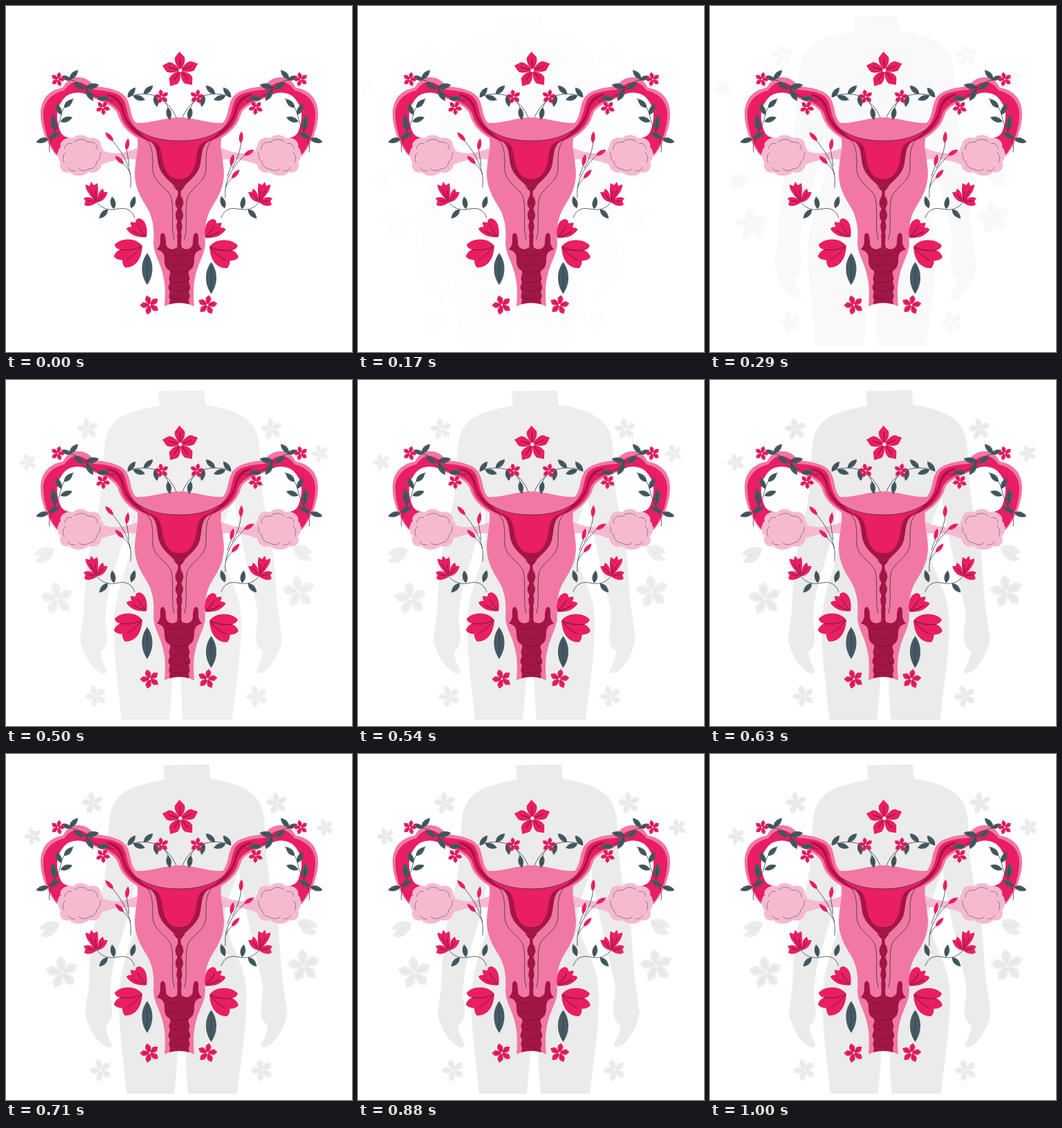
Write an HTML page that moves like this. It is 500 px wide and 500 px high and loops after 1.04 s.

```html
<!DOCTYPE html>
<html lang="en">
<head>
<meta charset="utf-8">
<title>Floral uterus</title>
<style>
  html, body { margin: 0; width: 100%; height: 100%; overflow: hidden; background: #fff; }
  svg { display: block; width: 100vw; height: 100vh; }
  .grey { fill: #ebebeb; --crease: #dedede; --eye: #f7f7f7; }
  .soft { fill: #f6bad0; }
  .pink { fill: #f178a4; }
  .hot { fill: #e91e63; }
  .wine { fill: #a31545; }
  .leaf { fill: #455a64; }
  .line { fill: none; stroke: #263238; stroke-width: .75; stroke-linecap: round; }
  .vein { fill: none; stroke: #263238; stroke-width: .5; stroke-linecap: round; }
  .crease { fill: none; stroke: var(--crease, #6b1c3c); stroke-width: 1; stroke-linecap: round; }
  .eye { fill: var(--eye, #fff); }
  .back { animation: slide 1040ms infinite; }
  @keyframes slide {
    0%, 3.85% {
      opacity: 0;
      transform: translateX(-30px);
      animation-timing-function: cubic-bezier(.4, .25, .4, 1.35);
    }
    100% { opacity: 1; transform: none; }
  }
</style>
</head>
<body>
<svg viewBox="0 0 500 500">
  <defs>
    <g id="petal">
      <path d="M0 0C-3-4-9-12-7-19L0-27L7-19C9-12 3-4 0 0Z"/>
      <path class="crease" d="M0-4V-17"/>
    </g>
    <g id="flower">
      <use href="#petal"/>
      <use href="#petal" transform="rotate(72)"/>
      <use href="#petal" transform="rotate(144)"/>
      <use href="#petal" transform="rotate(216)"/>
      <use href="#petal" transform="rotate(288)"/>
      <circle class="eye" r="2.600"/>
    </g>
    <g id="leaf">
      <path class="leaf" d="M0 0C-5-4-5-12 0-18C5-12 5-4 0 0Z"/>
      <path class="vein" d="M0 0V-13"/>
    </g>
    <path id="bud" class="hot" d="M0 0C-4-4-4-11 0-17C4-11 4-4 0 0Z"/>
    <g id="longLeaf">
      <path class="leaf" d="M0-23C-10-10-10 9 0 23C10 9 10-10 0-23Z"/>
      <path class="vein" d="M0-18V22"/>
    </g>
    <g id="greyTulip" class="grey">
      <path d="M14-8C5-15-10-12-15 0L-7 1L-14 9C-4 16 9 10 14-8Z"/>
      <path class="crease" d="M10-4Q3 0-5 1"/>
    </g>

    <!-- left side of the organ, reused as its reflection -->
    <g id="half">
      <path class="soft" d="M134 206C150 216 170 214 190 205V222C172 220 153 222 134 231Z"/>
      <path class="pink" d="M74 217C61 203 50 178 50 156C50 135 62 121 82 118C88 107 95 102.500 104 103C116 103 122 109 128 116C149 118 167 122 174 133C181 144 179 160 188 169C210 170 228 161 252 161V429C242 429 235 431 229 434C230 420 231 405 227 389C223 370 214 360 213 343C215 322 212 304 203 290C193 274 186 261 186 241C187 220 192 208 190 191C177 183 166 172 162 158C158 144 140 139 122 131C108 122 92 124 84 133C74 145 70 158 78 180C80 186 84 189 92 191Z"/>
      <path class="hot" d="M73 214C63 201 54 178 54 156C54 138 67 126 84 122C91 113 97 109 105 110C115 111 119 118 127 121C150 123 165 126 170 136C176 147 174 166 192 180C209 192 228 195 252 195V202L208 196C186 188 170 174 166 158C161 142 143 136 122 130C108 122 92 124 84 133C74 145 70 158 78 180C80 186 84 189 92 191Z"/>
      <path class="wine" d="M146 127C160 129 167 136 170 149C173 166 188 181 206 189C221 194 236 196 252 196V266H246C244 256 227 250 221 232C217 216 220 202 206 194C186 187 175 172 169 156C166 142 158 133 146 129Z"/>
      <path class="hot" d="M191 180C209 192 228 195 252 195V250H247C236 249 230 239 227 226C224 212 225 202 214 196C204 192 197 188 191 180Z"/>
      <path class="line" d="M191 180C209 191 228 195 252 195M204 194C213 204 212 220 212 236C213 256 234 262 239 277C243 296 238 318 243 337"/>
      <path class="wine" d="M245 260C248 266 250 270 247 277C242 285 246 289 248 294C243 300 245 307 248 311C245 318 247 323 248 327C246 334 249 340 247 349C241 354 231 351 231 342C231 335 230 328 226 328C222 329 223 336 223 340C223 346 220 349 218 352C227 354 229 359 229 366C229 373 230 379 236 382C240 386 234 391 236 396C239 400 233 404 235 409C239 413 234 418 236 422C238 425 236 429 236 431Q243 429 252 429V260Z"/>
      <path class="soft" d="M97 191C103 184 115 186 119 191C130 188 138 194 137 202C144 209 141 222 138 226C139 237 129 243 120 240C111 247 98 247 92 240C83 243 75 235 79 226C73 220 74 207 79 204C76 196 88 188 97 191Z"/>
      <path class="vein" d="M99 196C106 191 115 192 118 197C126 195 133 200 132 207M136 212C137 219 134 223 131 225C131 231 126 235 121 235C115 239 108 239 105 235M100 238C95 239 91 237 90 233M84 226C81 220 82 215 86 212M85 206C85 200 91 197 95 199"/>
    </g>

    <!-- upper garlands -->
    <g id="garland">
      <path class="line" d="M63 211C59 194 76 178 79 160C82 147 88 139 98 134M77 105C96 104 111 113 119 122C128 132 140 135 156 137M176 131C190 126 205 126 216 130C230 136 240 147 246 161M222 133C230 138 234 144 235 150"/>
      <use href="#leaf" transform="translate(61 192) rotate(-105)"/>
      <use href="#leaf" transform="translate(62 191) rotate(63)"/>
      <use href="#leaf" transform="translate(70 180) rotate(-6) scale(1.150 1.250)"/>
      <use href="#leaf" transform="translate(79 167) rotate(70)"/>
      <use href="#leaf" transform="translate(80 157) rotate(-27)"/>
      <use href="#leaf" transform="translate(84 147) rotate(45)"/>
      <use href="#leaf" transform="translate(92 106) rotate(42)"/>
      <use href="#leaf" transform="translate(94 107) rotate(-68) scale(.85)"/>
      <use href="#leaf" transform="translate(98 111) rotate(122)"/>
      <use href="#leaf" transform="translate(115 118) rotate(78) scale(1.100)"/>
      <use href="#leaf" transform="translate(116 120) rotate(150) scale(1.100)"/>
      <use href="#leaf" transform="translate(132 134) rotate(86)"/>
      <use href="#leaf" transform="translate(176 132) rotate(38)"/>
      <use href="#leaf" transform="translate(184 130) rotate(109)"/>
      <use href="#leaf" transform="translate(199 127) rotate(48)"/>
      <use href="#leaf" transform="translate(215 129) rotate(168) scale(.95)"/>
      <use href="#leaf" transform="translate(234 147) rotate(171)"/>
      <g class="hot">
        <use href="#flower" transform="translate(75 106) rotate(15) scale(.4)"/>
        <use href="#flower" transform="translate(140 147) rotate(30) scale(.4)"/>
        <use href="#flower" transform="translate(225 131) rotate(-12) scale(.4)"/>
      </g>
    </g>

    <!-- small fan blossom with its stem -->
    <g id="spray">
      <path class="line" d="M128 279C139 297 153 295 163 293C174 291 182 295 186 306"/>
      <use href="#leaf" transform="translate(147 294) rotate(-137)"/>
      <use href="#leaf" transform="translate(156 293) rotate(-9)"/>
      <use href="#leaf" transform="translate(181 292) rotate(17)"/>
      <path class="hot" d="M131 284C122 275 114 265 115 258L121 260L123 254L127 259L132 256C134 264 133 275 131 284Z"/>
      <path class="hot" d="M131 284C132 275 134 267 140 264L142 269L147 269L145 274C142 280 137 283 131 284Z"/>
      <path class="hot" d="M131 284C126 288 118 291 113 287L115 282L112 278C119 274 127 277 131 284Z"/>
      <path class="crease" d="M130 282L122 266M131 281L129 267M132 282L140 272M128 283L118 281"/>
    </g>
    <g id="tulips">
      <path class="hot" d="M203 334C205 325 203 313 197 309C193 306 190 307 188 309L187 313L180 312C180 316 181 318 182 319C178 319 175 320 174 322C180 332 192 335 203 334Z"/>
      <path class="crease" d="M202 332Q195 326 190 317M200 332Q190 330 183 325"/>
      <path class="hot" d="M197 347C188 334 166 335 157 345C158 349 161 351 165 352C160 354 157 358 156 362C159 366 163 367 168 367C168 371 169 375 172 378C188 378 196 365 197 347Z"/>
      <path class="crease" d="M196 347C185 353 174 353 165 352M195 349Q187 359 175 366"/>
    </g>
  </defs>

  <g class="back">
    <path class="grey" d="M226 16L292 15L294 36C317 39 342 46 356 59C370 71 373 91 373 113C374 152 379 183 388 222C394 250 394 284 398 325L405 373C403 391 394 406 384 417C377 424 370 426 367 421C371 413 377 403 377 391C369 389 367 378 367 365C369 351 371 344 369 331C363 301 346 240 335 166C331 185 318 205 316 235C318 275 345 300 346 345C347 394 338 444 333 491H262C260 470 259 449 258 425H247C246 449 244 470 242 491H173C169 445 161 397 162 350C163 312 177 280 184 255C189 230 189 205 185 183C179 220 171 249 161 280C154 303 151 320 150 340C148 353 153 360 152 374C151 384 148 390 143 392C143 403 148 411 152 420C150 428 143 424 136 418C124 408 118 393 113 376L119 331C119 289 125 249 134 212C143 177 146 151 147 113C148 91 150 73 164 60C179 46 205 42 228 37Z"/>
    <g class="grey">
      <use href="#flower" transform="translate(124 71) rotate(-10) scale(.62)"/>
      <use href="#flower" transform="translate(390 71) rotate(-10) scale(.62)"/>
      <use href="#flower" transform="translate(38 119) rotate(-20) scale(.5)"/>
      <use href="#flower" transform="translate(460 106) rotate(-20) scale(.5)"/>
      <use href="#flower" transform="translate(80 316) rotate(-8) scale(.92)"/>
      <use href="#flower" transform="translate(429 306) rotate(-8) scale(.92)"/>
      <use href="#flower" transform="translate(136 457) rotate(-20) scale(.63)"/>
      <use href="#flower" transform="translate(369 457) rotate(-20) scale(.63)"/>
    </g>
    <use href="#greyTulip" transform="translate(62 253)"/>
    <use href="#greyTulip" transform="matrix(-1 0 0 1 434 250)"/>
  </g>

  <use href="#half"/>
  <use href="#half" transform="matrix(-1 0 0 1 501 0)"/>
  <path class="vein" d="M247 277Q251 280 256 277M248 294Q252 297 255 293M248 311Q251 314 254 311M234 359Q248 363 266 358M231 371Q250 377 264 371M238 383Q252 388 265 382M237 397Q249 401 262 397M238 410Q252 414 263 409M238 422Q250 425 261 421M241 262Q250 266 258 262"/>

  <use href="#garland"/>
  <use href="#garland" transform="matrix(-1 0 0 1 501 0)"/>
  <use href="#flower" class="hot" transform="translate(252 93) rotate(-3)"/>

  <path class="line" d="M180 262C183 239 173 217 152 192M178 231Q176 217 174 205M180 243Q176 232 168 227"/>
  <use href="#bud" transform="translate(155 195) rotate(-43)"/>
  <use href="#bud" transform="translate(170 228) rotate(-47)"/>
  <use href="#bud" transform="translate(174 208) rotate(9)"/>
  <path class="line" d="M317 277C315 253 325 234 346 215M327 234Q337 218 340 197M318 261Q322 251 329 247M320 246Q322 238 326 230"/>
  <use href="#bud" transform="translate(339 198) rotate(5)"/>
  <use href="#bud" transform="translate(344 216) rotate(60)"/>
  <use href="#bud" transform="translate(326 249) rotate(43)"/>
  <use href="#bud" transform="translate(325 231) rotate(12)"/>

  <use href="#spray"/>
  <use href="#spray" transform="matrix(-1 0 0 1 497 0)"/>
  <use href="#tulips"/>
  <use href="#tulips" transform="matrix(-1.020 0 0 1 495 1)"/>
  <use href="#longLeaf" transform="translate(204 380)"/>
  <use href="#longLeaf" transform="translate(296.500 393)"/>
  <g class="hot">
    <use href="#flower" transform="translate(208 432) rotate(-20) scale(.54)"/>
    <use href="#flower" transform="translate(291 432) rotate(10) scale(.54)"/>
  </g>
</svg>
</body>
</html>
```
